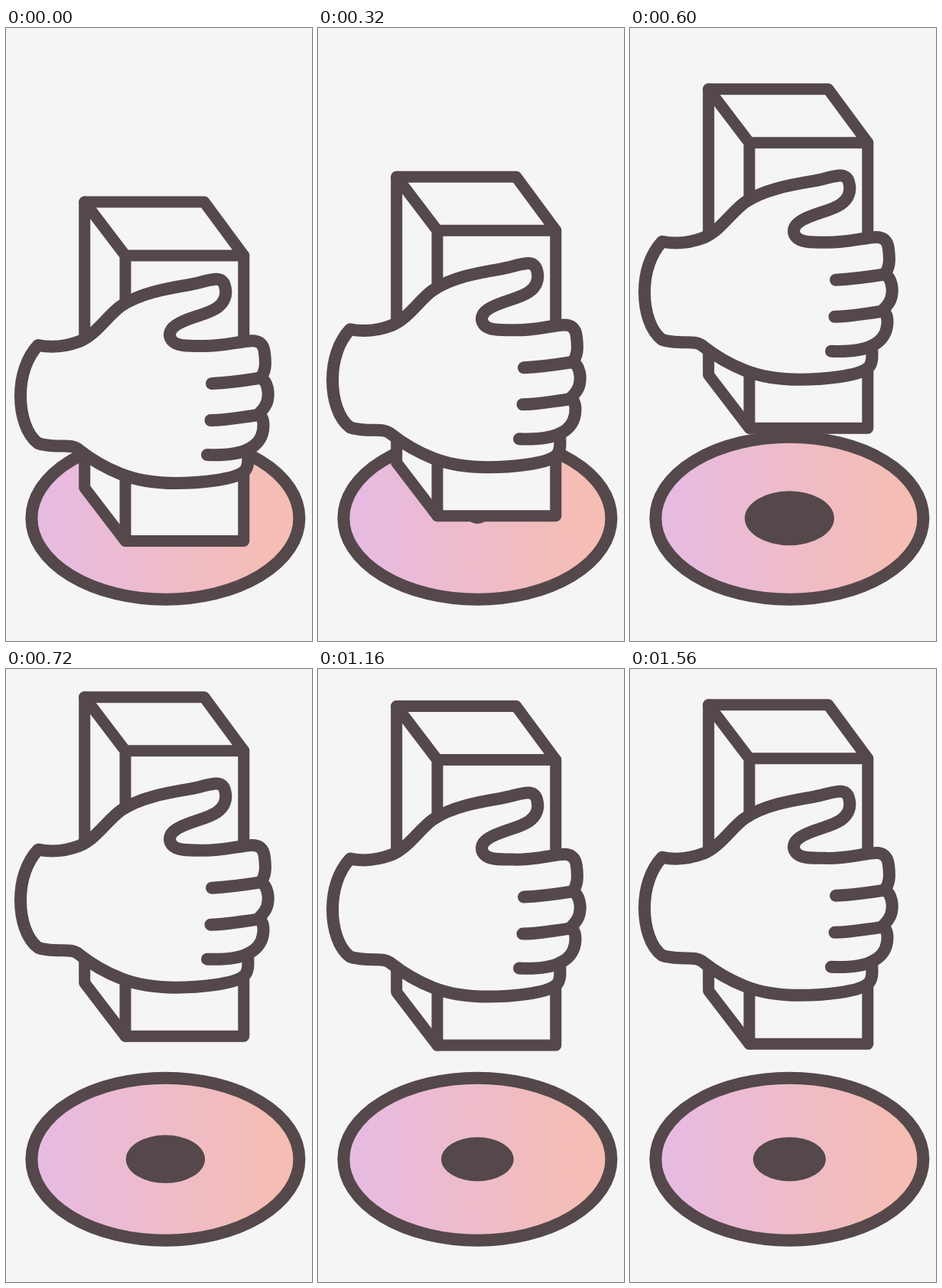
Recreate the animation shown at these times as an HTML page with a canvas. Size 400 by 800 pixels, loop 1.6 s.

```html
<!DOCTYPE html>
<html lang="en">
<head>
<meta charset="utf-8">
<title>Hand lifting a block</title>
<style>
  html, body { margin: 0; width: 100%; height: 100%; overflow: hidden; background: #f5f5f5; }
  canvas { display: block; }
</style>
</head>
<body>
<canvas id="stage" width="400" height="800"></canvas>
<script>
const ctx = document.getElementById('stage').getContext('2d');
const LOOP = 1600, STEP = 40;
const PAPER = '#f5f5f5', INK = '#54484b';

const blockOutline = new Path2D('M102.7 227V600L156 669.5H310.8V297L259 227Z');
const blockEdges = new Path2D('M102.7 227L156 297H310.8M156 297V669.5');

const handOutline = new Path2D(`M42 414
  C62 418 80 415 96 409 C118 400 132 376 150 363
  C175 346 210 340 240 335 C252 333 262 329 272 328
  C281 327 285 331 286.5 338 C289 348 286 358 276 365
  C262 375 238 377 222 388 C213 394 212 402 217 408
  C223 415 236 415 255 415 C280 416 300 410 318 408.5
  C330 407 337 412 338 424 C340 440 339 448 333 457
  C343 461 343 478 342.5 481 C342 490 338 496 330 504
  C337 508 337 518 336 525 C334 538 325 546 316 550
  C316.5 560 318 572 312 578 C300 590 250 594 222 594
  C195 594 170 590 150 582 C130 574 110 562 96 551
  C88 544 78 546 68 545.5 C56 545 50 545 42 542
  C27 531 19 506 19 480 C19 454 27 430 42 414Z`);
const fingers = new Path2D(`M269 464C290 463 312 460 331 457
  M267.5 512C288 512 306 508 330 505
  M263 557C290 558 306 555 316 550`);

const gradient = ctx.createLinearGradient(55, 0, 350, 0);
gradient.addColorStop(0, '#e7bae1');
gradient.addColorStop(1, '#f5bdb3');

const ramp = (t, from, to) => Math.min(1, Math.max(0, (t - from) / (to - from)));

// Linear move that swings past its end and settles, keeping its arrival speed.
function springRamp(t, from, to) {
  if (t <= to) return ramp(t, from, to);
  const s = (t - to) / 1000;
  const speed = 1000 / (to - from);
  return 1 + 0.1 * speed * Math.sin(2 * Math.PI * 1.3 * s) * Math.exp(-6 * s);
}

function ellipse(rx, ry) {
  ctx.beginPath();
  ctx.ellipse(208.4, 639.7, rx, ry, 0, 0, 2 * Math.PI);
}

function drawDisc(holeScale) {
  ellipse(175, 106);
  ctx.fillStyle = gradient;
  ctx.fill();
  ctx.lineWidth = 16;
  ctx.stroke();
  ellipse(47.5 * holeScale, 28.8 * holeScale);
  ctx.fillStyle = INK;
  ctx.fill();
}

function drawShape(outline, details, y, width) {
  ctx.save();
  ctx.translate(0, y);
  ctx.lineWidth = width;
  ctx.fillStyle = PAPER;
  ctx.fill(outline);
  ctx.stroke(outline);
  ctx.stroke(details);
  ctx.restore();
}

function draw(t) {
  const lift = -180 * springRamp(t, 240, 680);
  const slip = 12 * ramp(t, 0, 200);
  ctx.fillStyle = PAPER;
  ctx.fillRect(0, 0, 400, 800);
  ctx.strokeStyle = INK;
  ctx.lineCap = ctx.lineJoin = 'round';
  drawDisc(springRamp(t, 280, 440));
  drawShape(blockOutline, blockEdges, lift, 15);
  drawShape(handOutline, fingers, lift + slip, 16);
}

const start = performance.now();
function tick() {
  // Motion runs at 25 poses per second; the small lead absorbs timer jitter.
  const elapsed = performance.now() - start + 8;
  draw(Math.floor(elapsed / STEP) * STEP % LOOP);
  requestAnimationFrame(tick);
}
tick();
</script>
</body>
</html>
```
